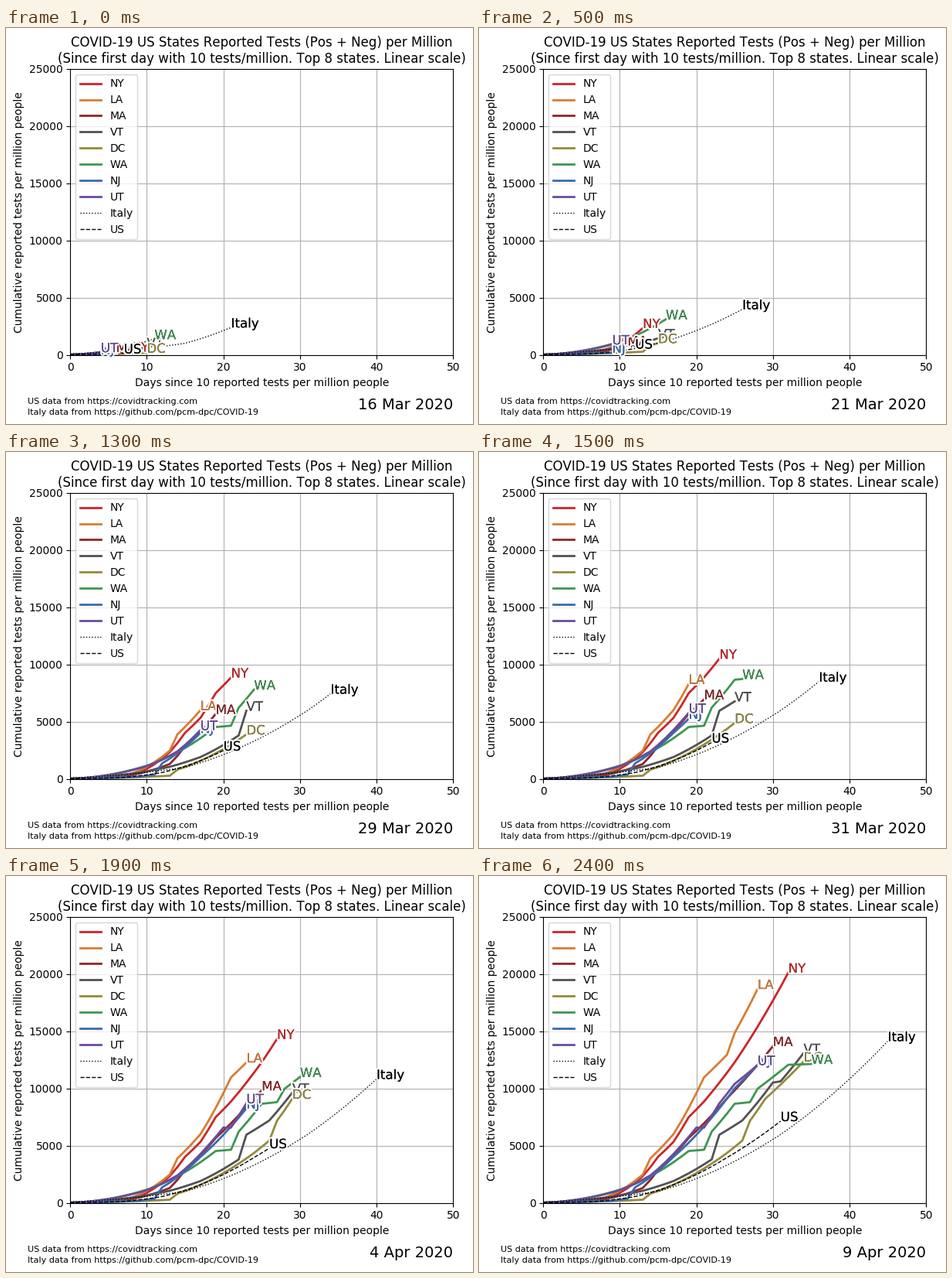
Animation of 605x512 px, one loop 4900 ms. Source, as a matplotlib script:

```python
import numpy as np
import matplotlib.pyplot as plt
from matplotlib.animation import FuncAnimation
from matplotlib.patheffects import Normal, PathPatchEffect, Stroke

W, H, DPI = 605, 512, 100
DAYS = 24          # days from 16 March to 9 April
FRAMES = 49        # the last day is held until the loop ends

plt.rcParams["font.family"] = "DejaVu Sans"
plt.rcParams["text.kerning_factor"] = 6   # whole-pixel kerning

fig = plt.figure(figsize=(W / DPI, H / DPI), dpi=DPI, facecolor="white")
ax = fig.add_axes([83.2 / W, 89.47 / H, 496 / W, 369.6 / H])
ax.set(xlim=(0, 50), ylim=(0, 25000),
       xlabel="Days since 10 reported tests per million people",
       ylabel="Cumulative reported tests per million people")
ax.set_title("COVID-19 US States Reported Tests (Pos + Neg) per Million\n"
             "(Since first day with 10 tests/million. Top 8 states. Linear scale)")
ax.grid(True)

# white halo, then a dark layer that gives the letters heavier edges
halo = [Stroke(linewidth=3, foreground="white"),
        PathPatchEffect(facecolor="black", linewidth=0), Normal()]
tracks = []


def add(name, color, *keys, first=10, **style):
    """Add a curve of quadratic growth pieces through (day, tests) key points."""
    days, tests = zip((0, first), *keys)
    x = np.arange(days[-1] + 1)
    y = np.interp(x, days, np.sqrt(tests)) ** 2
    line, = ax.plot([], [], color=color, label=name, **{"lw": 2, **style})
    tag = ax.text(0, 0, name, color=color, fontsize=12, path_effects=halo)
    tracks.append((line, tag, x, y))


add("NY", "#cc2529", (8, 282), (13, 2336), (15, 4025), (17, 5320),
    (19, 7493), (21, 8860), (25, 12284), (32, 20128))
add("LA", "#da7c30", (8, 440), (13, 2463), (14, 3890), (17, 5995),
    (21, 10970), (24, 12950), (25, 14850), (28, 18700))
add("MA", "#922428", (9, 454), (13, 1294), (15, 2871), (19, 5666),
    (24, 9132), (30, 13700))
add("VT", "#535154", (13, 1050), (17, 1900), (22, 3790), (23, 5950),
    (26, 7200), (30, 10520), (31, 10620), (34, 13090))
add("DC", "#948b3d", (13, 270), (14, 800), (18, 1890), (24, 4360),
    (26, 5440), (27, 7170), (29, 9100), (34, 12350))
add("WA", "#3e9651", (11, 1370), (16, 3100), (19, 4530), (21, 4640),
    (22, 6220), (25, 8660), (27, 8800), (28, 9980), (32, 12070), (35, 12140))
add("NJ", "#396ab1", (9, 179), (11, 361), (12, 1351), (17, 4008),
    (25, 10009), (28, 12050))
add("UT", "#6b4c9a", (10, 1100), (14, 2400), (18, 5000), (20, 6580),
    (21, 6580), (23, 8700), (25, 10400), (28, 12050))
add("Italy", "black", (15, 1008), (31, 5982), (45, 14138),
    first=72, lw=1, ls=":")
add("US", "black", (7, 125), (12, 547), (16, 1330), (24, 3960), (31, 7140),
    lw=1, ls="--")

ax.legend(loc="upper left")

fig.text(28 / W, 26 / H, "US data from https://covidtracking.com", fontsize=8)
fig.text(28 / W, 12 / H,
         "Italy data from https://github.com/pcm-dpc/COVID-19", fontsize=8)
date = fig.text(579 / W, 19 / H, "", fontsize=14, ha="right")


def update(frame):
    left = DAYS - min(frame, DAYS)
    for line, tag, x, y in tracks:
        n = len(x) - left
        line.set_data(x[:n], y[:n])
        tag.set_position((x[n - 1], y[n - 1]))
    day = 16 + DAYS - left
    date.set_text(f"{day} Mar 2020" if day <= 31 else f"{day - 31} Apr 2020")
    return []


anim = FuncAnimation(fig, update, frames=FRAMES, interval=100,
                     init_func=lambda: update(0), repeat=True, repeat_delay=0)
plt.show()
```
